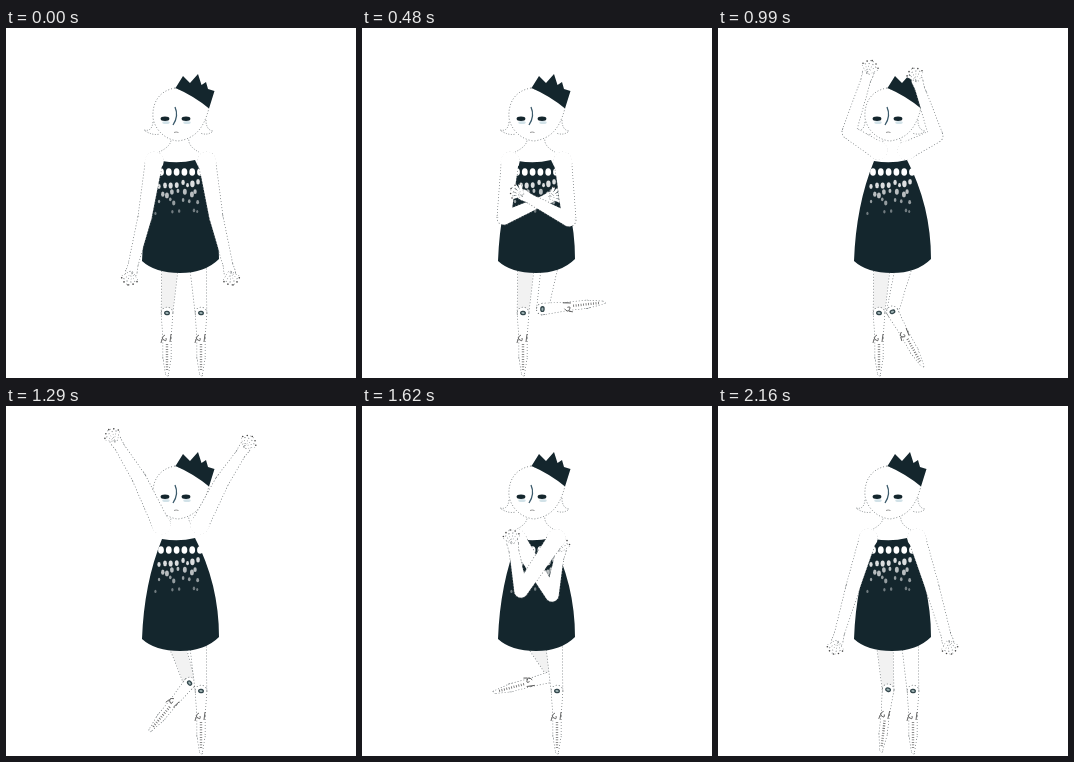
Animation, 350 px wide and 350 px high, one loop 2190 ms. Source, as an HTML page with a canvas:

```html
<!DOCTYPE html>
<html lang="en">
<head>
<meta charset="utf-8">
<title>Paper doll dance</title>
<style>
html, body { margin: 0; width: 100%; height: 100%; overflow: hidden; background: #fff; }
canvas { display: block; }
</style>
</head>
<body>
<canvas id="stage" width="350" height="350"></canvas>
<script>
const g = document.getElementById('stage').getContext('2d');
const LOOP = 2190, HALF = LOOP / 2, STEP = 30, AXIS = 174.5;
const INK = '#14262d', EDGE = '#6b7174', rad = Math.PI / 180;

// key poses of the left arm: time, elbow x y, forearm angle, reach
const POSES = [
  [0, 139, 189, 104, 69],      // hanging
  [180, 126, 178, 110, 66],    // swung out
  [480, 142, 190, -27, 64],    // hugging
  [750, 124, 133, -87, 66],    // elbows raised
  [990, 131, 104, -72, 74],    // over the head
  [1140, 138, 78, -85, 66],
  [1290, 133, 72, -122, 56],   // spread
  [1620, 190, 185, -80, 61],   // crossed
  [1900, 135, 180, -205, 44],  // swung out
  [2190, 135, 182, -259, 71]   // hanging
];

// spline through the poses
function poseAt(t) {
  let i = 0;
  while (i < POSES.length - 2 && POSES[i + 1][0] <= t) i++;
  const a = POSES[i], b = POSES[i + 1], before = POSES[i - 1] || a, after = POSES[i + 2] || b;
  const h = b[0] - a[0], u = (t - a[0]) / h;
  return a.map((v, c) => {
    const m = (b[c] - before[c]) / (b[0] - before[0]);
    const n = (after[c] - v) / (after[0] - a[0]);
    return v + (b[c] - v) * u * u * (3 - 2 * u) + h * u * (1 - u) * (m * (1 - u) - n * u);
  }).slice(1);
}

const polar = ([x, y], angle, d) => [x + Math.cos(angle) * d, y + Math.sin(angle) * d];

function line(d, color, width, dash = []) {
  g.strokeStyle = color;
  g.lineWidth = width;
  g.setLineDash(dash);
  g.stroke(d);
  g.setLineDash([]);
}

function fill(d, color) {
  g.fillStyle = color;
  g.fill(d);
}

function oval(x, y, rx, ry, color) {
  const p = new Path2D();
  p.ellipse(x, y, rx, ry, 0, 0, 7);
  fill(p, color);
}

// chain of tapered capsules given as [point, radius]
function limb(joints, color = '#fff') {
  const p = new Path2D();
  joints.forEach(([[x, y], r], i) => {
    p.moveTo(x + r, y);
    p.arc(x, y, r, 0, 2 * Math.PI);
    if (!i) return;
    const [[px, py], pr] = joints[i - 1];
    const d = Math.hypot(x - px, y - py) || 1, nx = (y - py) / d, ny = (px - x) / d;
    p.moveTo(px + nx * pr, py + ny * pr);
    p.lineTo(x + nx * r, y + ny * r);
    p.lineTo(x - nx * r, y - ny * r);
    p.lineTo(px - nx * pr, py - ny * pr);
    p.closePath();
  });
  line(p, EDGE, 1.4, [1, 2]);
  fill(p, color);
}

// side: 1 lifts the shin to the right, -1 to the left; p: progress of the lift
function leg(side, p, { x, hip, swing, shift, delay, rise, thigh }) {
  const wave = Math.sin(Math.PI * p);
  const inward = -side * shift * p ** delay * Math.sqrt(wave);
  const knee = [x + inward, 285 - rise * wave];
  const a = (90 - side * swing * wave) * rad;
  const ankle = polar(knee, a, 25);
  limb([[[hip + inward * .3, 238], 8], [knee, 5.5]], thigh);
  limb([[knee, 5.5], [ankle, 3.8], [polar(knee, a, 45), 3.8], [polar(knee, a, 62), 1]]);

  g.save();
  g.translate(...knee);
  g.rotate(a - 1.4);
  oval(0, 0, 3, 2.3, '#33474c');
  oval(0, 0, 1.7, 1, '#9fb3b5');
  g.restore();

  g.save();
  g.translate(...ankle);
  g.rotate(a);
  line(new Path2D('M-4 -4L4 -3M-3 2Q0 7 2 3Q4 0 0 1M1 5L5 6'), '#444', .8);
  line(new Path2D('M6 0L33 0'), '#666', 2.4, [.8, 1.7]);
  g.restore();
}

function hand(palm, angle) {
  for (let i = -2; i <= 2; i++) {
    const tip = polar(palm, angle + i * .4, 13 - Math.abs(i));
    const p = new Path2D();
    p.moveTo(...palm);
    p.lineTo(...tip);
    line(p, EDGE, 3.6, [1, 2]);
    line(p, '#fff', 2.7);
    oval(...tip, .8, .8, '#444');
  }
}

function arm(shoulder, elbow, tip) {
  const dx = tip[0] - elbow[0], dy = tip[1] - elbow[1];
  const a = Math.atan2(dy, dx), palm = polar(elbow, a, Math.hypot(dx, dy) - 12);
  limb([[shoulder, 8.5], [elbow, 6.7], [polar(palm, a, -8), 4.6], [palm, 5.5]]);
  oval(...shoulder, 9.5, 9.5, '#fff');
  hand(palm, a);
}

function arms(t) {
  const [ex, ey, deg, reach] = poseAt(t), a = deg * rad;
  const low = Math.min(1, Math.max(0, (ey - 75) / 115));
  const shoulder = [156 - 8 * low + 10 * Math.sin(Math.PI * low) + (ex - 140) * .1, 119 + 14 * low];
  const joints = [shoulder, [ex, ey], polar([ex, ey], a, reach)];
  // lifted hands hang a little lower on the right
  const drop = 8 * Math.max(0, -Math.sin(a));
  const settle = ([x, y], i) => [x, y + (x > AXIS ? drop * i / 2 : 0)];
  arm(...joints.map(settle));
  arm(...joints.map(([x, y]) => [2 * AXIS - x, y]).map(settle));
}

function dress() {
  fill(new Path2D('M156 133Q173 136 189 132Q213 178 213 231Q199 245 174 245Q149 245 136 233Q138 177 156 133Z'), INK);
  let seed = 7;
  const random = () => (seed = seed * 16807 % 2147483647) / 2147483647;
  for (let i = 0; i < 6; i++) oval(155 + 7.8 * i, 144, 2.9, 3.8, '#fff');
  // beads fade and thin out downwards
  for (let row = 1; row < 5; row++) {
    const n = 9 - row, width = 36 + row * 4;
    for (let i = 0; i < n; i++) {
      const x = 173 + width * ((i + random()) / n - .5), y = 144 + row * 9 + random() * 6;
      const r = (2.6 - row * .3) * (.6 + random() * .4);
      oval(x, y, r, r * 1.5, `rgba(255,255,255,${1 - row * .15})`);
    }
  }
}

function head() {
  const neck = 'M165 110Q166 118 153 124', nape = 'M183 109Q181 118 193 124';
  fill(new Path2D(neck + 'L157 132Q173 135 189 131L193 124Q181 118 183 109Z'), '#fff');
  line(new Path2D(neck + nape), EDGE, .8, [1, 1.7]);
  const face = new Path2D('M169 60C152 63 146 76 147 90C150 105 162 112 172 113C186 111 197 104 203 80Q190 65 169 60Z');
  fill(face, '#fff');
  line(face, EDGE, .8, [1, 2]);
  line(new Path2D('M147 94Q146 104 138 102Q146 108 154 106M200 92Q200 102 207 103Q202 108 194 105'), EDGE, .8, [1, 1.6]);
  fill(new Path2D('M169.5 60L177 48L184 55L192 46L195.5 57L200 54L202 61L208.5 63L203 80.5Q188 68 169.5 60Z'), INK);
  for (const x of [159, 180]) {
    oval(x + 1, 94.5, 3.7, 1.5, '#d2e2e8');
    oval(x, 90.8, 4.4, 2.2, INK);
  }
  line(new Path2D('M169 79Q173 88 167 97'), '#3b5a6b', 1.3);
  line(new Path2D('M168 104.5Q170 103.5 172.5 104.5'), '#999', 1);
}

function draw(now) {
  const t = Math.floor(now % LOOP / STEP) * STEP;
  const progress = start => Math.min(1, Math.max(0, (t - start) / HALF));
  g.clearRect(0, 0, 350, 350);
  leg(-1, progress(HALF), { x: 161, hip: 164, swing: 75, shift: 31, delay: 0, rise: 15, thigh: '#f2f2f2' });
  leg(1, progress(0), { x: 195, hip: 192, swing: 98, shift: 43, delay: 1.3, rise: 4 });
  dress();
  head();
  arms(t);
}

function tick() {
  draw(performance.now());
  requestAnimationFrame(tick);
}
tick();
</script>
</body>
</html>
```
